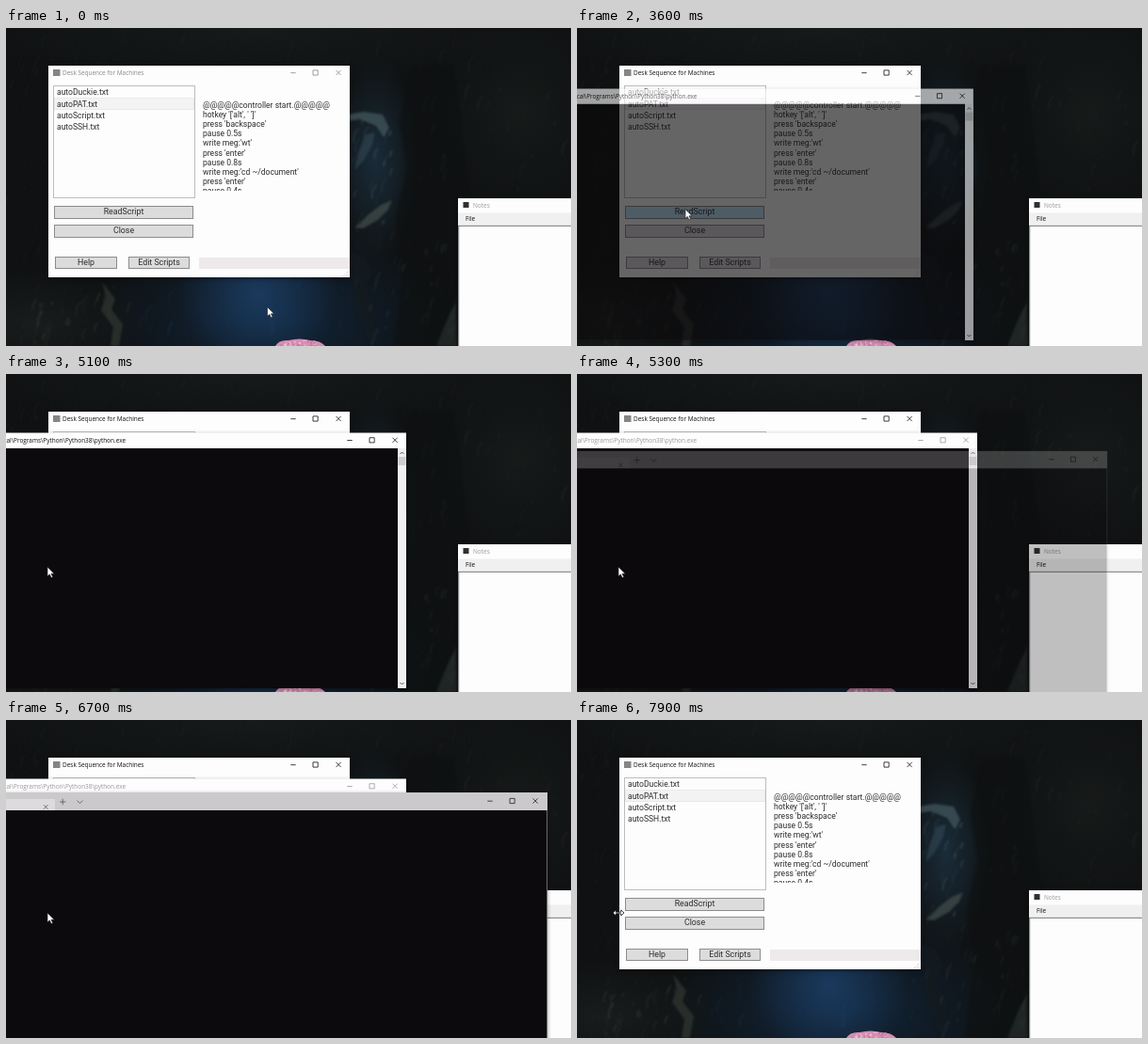
An HTML page for the animation above (8 s loop, 600 by 338 pixels).

```html
<!DOCTYPE html>
<html lang="en">
<head>
<meta charset="utf-8">
<title>Desktop automation</title>
<style>
html, body { margin: 0; width: 100%; height: 100%; overflow: hidden; background: #0f1113; }
svg { display: block; width: 100vw; height: 100vh; }
text { white-space: pre; }
.ui { font-family: "Open Sans", "Noto Sans", sans-serif; font-size: 6.45px; }
.din { font-family: Roboto, "Open Sans", sans-serif; font-size: 8.55px; fill: #2c2c2c; }
.btn { font-size: 8.8px; text-anchor: middle; }
</style>
</head>
<body>
<svg id="stage" viewBox="0 0 600 338" preserveAspectRatio="none"></svg>
<script>
const LOOP = 8000, STEP = 100;
const BLACK = '#0c0a0c', BAR = '#cbc9cb', PAPER = '#fefdfe';

let seed = 29;
const random = () => (seed = (seed * 16807) % 2147483647) / 2147483647;
const between = (a, b) => a + (b - a) * random();
const repeat = (n, make) => Array.from({ length: n }, (_, i) => make(i)).join('');

const rect = (x, y, w, h, fill, extra = '') =>
  `<rect x="${x}" y="${y}" width="${w}" height="${h}" fill="${fill}" ${extra}/>`;
const text = (x, y, value, cls, extra = '') =>
  `<text x="${x}" y="${y}" class="${cls}" ${extra}>${value}</text>`;
const line = (d, color, width = 0.8, extra = '') =>
  `<path d="${d}" fill="none" stroke="${color}" stroke-width="${width}" ${extra}/>`;
const shape = (d, fill, opacity) => `<path d="${d}" fill="${fill}" opacity="${opacity}"/>`;
const button = (x, y, w, h, label, id = '') =>
  rect(x + .5, y + .5, w - 1, h - 1, '#dddcdd', `stroke="#8c8c8c" id="${id}"`) +
  text(x + w / 2, y + h / 2 + 2.2, label, 'din btn');

let glows = 0;
function glow(x, y, rx, ry, color, opacity) {
  const id = 'glow' + glows++;
  return `<radialGradient id="${id}"><stop stop-color="${color}" stop-opacity="${opacity}"/>
    <stop offset=".5" stop-color="${color}" stop-opacity="${opacity * .5}"/>
    <stop offset="1" stop-color="${color}" stop-opacity="0"/></radialGradient>
    <ellipse cx="${x}" cy="${y}" rx="${rx}" ry="${ry}" fill="url(#${id})"/>`;
}

function controls(x, y) {
  return line(`M${x - 2.7} ${y + .2}h5.4 M${x + 21} ${y - 2.6}h5.2v5.2h-5.2z ` +
    `M${x + 45.5} ${y - 2.6}l5.2 5.2m0-5.2l-5.2 5.2`, 'currentColor');
}

function streaks(n, x0, x1, y0, y1, color, opacity) {
  return repeat(n, () => {
    const x = between(x0, x1), y = between(y0, y1), len = between(3, 16);
    return line(`M${x} ${y}l${-len * .3} ${len * .45}l${-len * .05} ${len * .6}`,
      color, between(.5, 1.8), `opacity="${opacity * random()}"`);
  });
}

function cave() {
  return rect(0, 0, 600, 338, '#0f1112') +
    glow(260, 0, 300, 60, '#1a1e1e', .7) +
    glow(545, 90, 100, 110, '#1c201e', .6) +
    glow(280, 310, 190, 110, '#11253a', 1) +
    glow(268, 282, 85, 80, '#1d4068', .8) +
    glow(392, 140, 48, 110, '#1b2f3d', .9) +
    glow(30, 315, 120, 60, '#1b1f1f', .8) +
    `<g filter="url(#fine)">
      ${shape('M432 40l-14 60 8 50-12 50 8 60-10 78h66l14-160-16-138z', '#0f1112', .65)}
      ${shape('M362 92l18-3 20 3 7 14-6 10-8-12-17-7-14 2z', '#526a70', .55)}
      ${shape('M382 113l10-2-3 13-9 17-10 10 4-18z', '#354d5b', .5)}
      ${shape('M410 183l-12 5-14 11-13 13 8 1 16-9 11-11z', '#4c5854', .6)}
      ${shape('M366 238l14 5 9 18-8 16 12 24-6 37-16-40z', '#151c20', .7)}
      ${shape('M102 270l14 18-4 11 12 16-4 23h-9l3-20-13-18 5-15z', '#454a42', .45)}
      ${shape('M478 292l-8 14-13 32h22z', '#333a38', .5)}
      ${streaks(55, 20, 135, 265, 338, '#535850', .4)}
      ${streaks(60, 140, 430, 262, 338, '#315273', .22)}
      ${streaks(45, 385, 480, 220, 338, '#45534f', .35)}
      ${streaks(50, 440, 600, 30, 178, '#444b44', .25)}
      ${streaks(40, 0, 45, 30, 260, '#3c4141', .22)}
      ${streaks(60, 20, 510, 0, 38, '#3c4240', .22)}
      ${streaks(35, 366, 412, 95, 225, '#6f858a', .35)}
    </g>` +
    shape('M286 338q4-7 14-6q12-3 23 0q11 0 16 6z', '#d68db2', 1) +
    repeat(60, () => {
      const a = between(Math.PI, 2 * Math.PI), r = Math.sqrt(random());
      const color = ['#c774a0', '#e6a4c5', '#f3cfe0', '#dc8fb6'][Math.floor(random() * 4)];
      return `<circle cx="${312 + 24 * r * Math.cos(a)}" cy="${339 + 7 * r * Math.sin(a)}" r="${between(.6, 1.4)}" fill="${color}"/>`;
    });
}

function mainWindow() {
  const files = ['autoDuckie.txt', 'autoPAT.txt', 'autoScript.txt', 'autoSSH.txt'];
  const script = ['@@@@@controller start.@@@@@', "hotkey '['alt', ' ']'", "press 'backspace'",
    'pause 0.5s', "write meg:'wt'", "press 'enter'", 'pause 0.8s',
    "write meg:'cd ~/document'", "press 'enter'", 'pause 0.4s'];
  return rect(45, 40, 320, 225, PAPER, 'filter="url(#shadow)"') +
    `<g id="mainTitle">${rect(50, 44, 7.5, 7, '#858585')}
      ${text(60, 50, 'Desk Sequence for Machines', 'ui', 'fill="currentColor"')}
      ${controls(305, 47.5)}</g>` +
    rect(50.5, 61.5, 150, 119, PAPER, 'stroke="#bdbdbd"') +
    rect(51.5, 74.7, 148, 12, '#f4f3f4', 'stroke="#e2e2e2" stroke-width=".7"') +
    files.map((name, i) => text(54, 71.2 + i * 12.3, name, 'din')).join('') +
    `<g clip-path="url(#preview)">${script.map((s, i) => text(209, 84.8 + i * 10.15, s, 'din')).join('')}</g>` +
    button(51, 189, 148, 14, 'ReadScript', 'read') +
    button(51, 209, 148, 14, 'Close') +
    button(52, 243, 66, 13, 'Help') + button(130, 243, 65, 13, 'Edit Scripts') +
    rect(205, 244, 160, 12, '#eee9eb') +
    line('M358 264l6-6m-3 6l3-3', '#b5b5b5', .8, 'stroke-dasharray="1 1"');
}

function notesWindow() {
  return rect(480, 181, 125, 160, PAPER, 'filter="url(#shadow)"') +
    rect(480, 196.5, 120, 13, '#f0f0f0') +
    line('M480 210.3h120M480.7 210v128', '#747474', 1) +
    rect(485.5, 185, 6, 6, '#303030') +
    text(496, 190.7, 'Notes', 'ui', 'fill="#999"') + text(488, 205.3, 'File', 'ui', 'fill="#111"');
}

function consoleWindow() {
  return rect(-220, 62.5, 645, 271.5, PAPER, 'filter="url(#shadow)"') +
    `<g id="consoleTitle">${text(127, 73, 'Local\\Programs\\Python\\Python38\\python.exe', 'ui',
      'text-anchor="end" fill="currentColor"')}${controls(365, 70.3)}</g>` +
    rect(-220, 79, 636, 255, BLACK) + rect(416, 79, 9, 255, '#f0f0f0') +
    rect(416.5, 88, 8, 9, '#cdcdcd') +
    line('M418.5 85l2-2 2 2M418.5 328l2 2 2-2', '#555', 1);
}

function terminalWindow() {
  return rect(-200, 77, 775, 290, BAR, 'filter="url(#shadow)"') +
    `<g id="terminalBody" color="#222">${rect(-200, 84, 252, 12, '#dddbde')}
      ${line('M40 90.2l4.5 4.5m0-4.5l-4.5 4.5M57 87h6.4m-3.2-3.2v6.4M75.5 85.7l3 2.8 3-2.8', '#555')}
      ${controls(514, 86)}${rect(-200, 96, 774.5, 250, BLACK)}</g>`;
}

const stage = document.getElementById('stage');
stage.innerHTML = `<defs>
  <filter id="fine" color-interpolation-filters="sRGB"><feGaussianBlur stdDeviation=".9"/></filter>
  <filter id="shadow" color-interpolation-filters="sRGB" x="-5%" y="-5%" width="110%" height="112%"><feDropShadow dx="0" dy="1.5" stdDeviation="2" flood-opacity=".4"/></filter>
  <clipPath id="preview"><rect x="205" y="76" width="160" height="97"/></clipPath></defs>
  ${cave()}${mainWindow()}${notesWindow()}
  <g id="console">${consoleWindow()}</g><g id="terminal">${terminalWindow()}</g>
  <path id="arrow" d="M0 0v10l2.3-2.1 1.7 3.6 1.7-.8-1.7-3.4h3.2z" fill="#fff" stroke="#222" stroke-width=".7"/>
  <path id="resize" d="M38 205l3.3-3v2.2h5.4V202l3.3 3-3.3 3v-2.2h-5.4v2.2z" fill="#fff" stroke="#111" stroke-width=".8"/>`;
const el = id => document.getElementById(id);

const clamp = v => Math.max(0, Math.min(1, v));
const progress = (t, from, to) => clamp((t - from) / (to - from));
const ease = p => p * p * (3 - 2 * p);
const within = (t, from, to) => t >= from && t < to;

// time, x, y
const pointer = [[0, 277.5, 296.5], [800, 116, 96], [1300, 116, 96], [1800, 91.5, 77],
  [2200, 91.5, 77], [3000, 115, 192.5], [4000, 115, 192.5], [4800, 44, 205], [8000, 44, 205]];

function pointerAt(t) {
  const i = pointer.findIndex((p, n) => n && t <= p[0]);
  const a = pointer[i - 1], b = pointer[i], p = ease(progress(t, a[0], b[0]));
  return [a[1] + (b[1] - a[1]) * p, a[2] + (b[2] - a[2]) * p];
}

function showWindow(id, opacity, cx, cy) {
  const scale = 1 - .04 * (1 - opacity);
  el(id).setAttribute('opacity', opacity);
  el(id).setAttribute('transform', `translate(${cx} ${cy}) scale(${scale}) translate(${-cx} ${-cy})`);
}

function render(t) {
  const [x, y] = pointerAt(t);
  el('arrow').setAttribute('transform', `translate(${x} ${y})`);
  el('arrow').style.display = t < 7800 ? '' : 'none';
  el('resize').style.display = t < 7800 ? 'none' : '';
  el('mainTitle').setAttribute('color', t < 2100 ? '#888' : '#111');
  el('consoleTitle').setAttribute('color', within(t, 5300, 7700) ? '#999' : '#111');
  el('read').setAttribute('fill', within(x, 51, 199) && within(y, 189, 203) ? '#bee6fd' : '#dddcdd');
  showWindow('console', progress(t, 3450, 3690) * (1 - progress(t, 7650, 7850)), 150, 198);
  showWindow('terminal', progress(t, 5250, 5450) * (1 - progress(t, 7520, 7720)), 180, 240);
  el('terminalBody').style.display = t < 7400 ? '' : 'none';
}

function tick(now) {
  render(Math.floor((now % LOOP) / STEP) * STEP);
  requestAnimationFrame(tick);
}
render(0);
requestAnimationFrame(tick);
</script>
</body>
</html>
```
